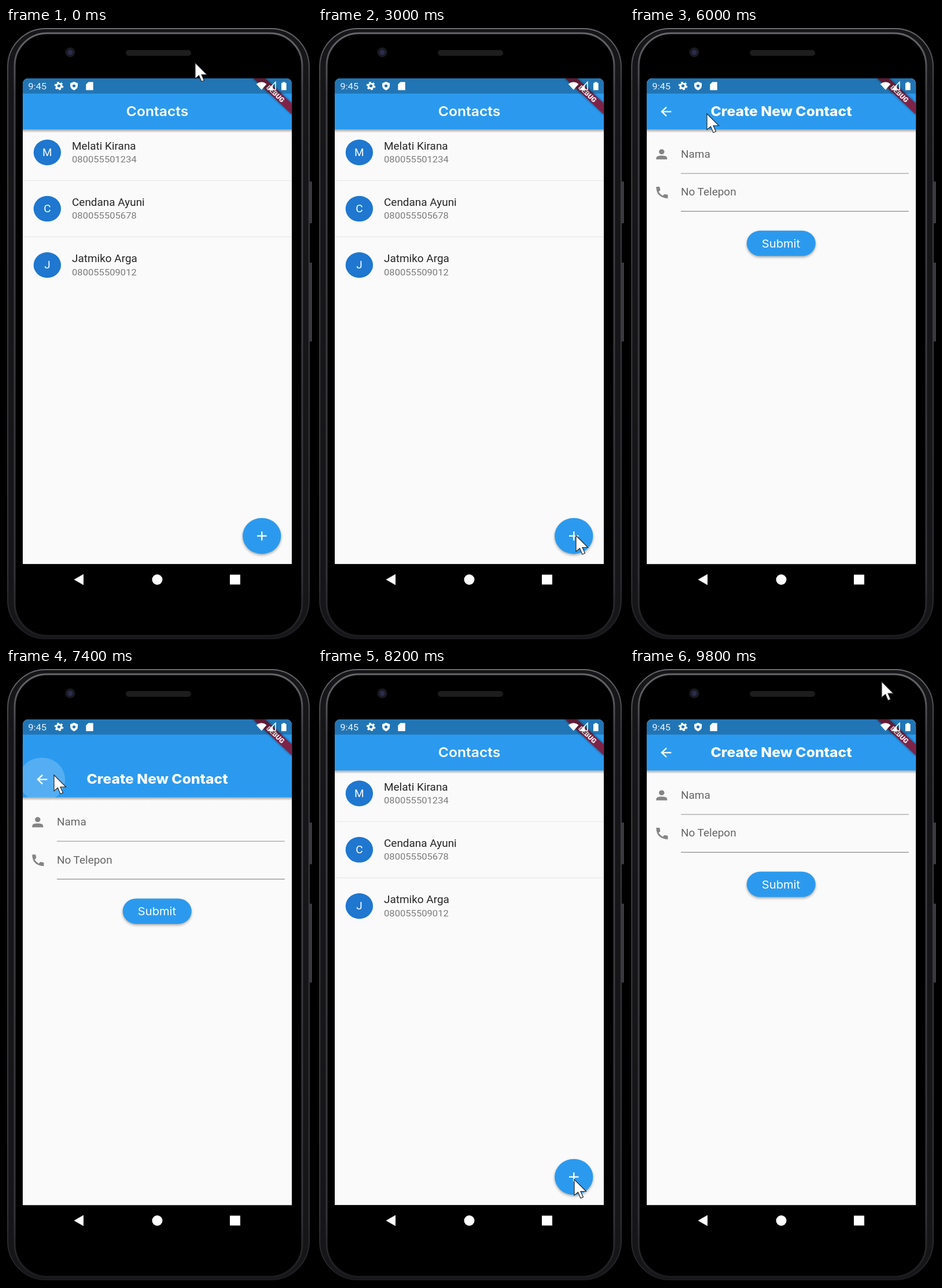
An HTML page for the animation above (9900 ms loop, 529 px wide and 1058 px high).

```html
<!DOCTYPE html>
<html lang="id">
<head>
<meta charset="utf-8">
<title>Contacts</title>
<style>
html, body { margin: 0; width: 100%; height: 100%; overflow: hidden; background: #000; }
svg { display: block; width: 100%; height: 100%; font-family: Roboto, sans-serif; }
.head { font-family: Inter, sans-serif; fill: #fff; text-anchor: middle; }
.name { font-size: 16px; fill: #252525; }
.tel { font-size: 14px; fill: #7b7b7b; }
.label { font-size: 16px; fill: #666; }
.mid { text-anchor: middle; fill: #fff; }
.raised { filter: drop-shadow(0 2px 2px #0005); }
.ribbon { filter: drop-shadow(0 0 2px #0008); }
</style>
</head>
<body>
<svg viewBox="0 0 529 1058" preserveAspectRatio="none">
  <defs>
    <linearGradient id="shade" x2="0" y2="1">
      <stop stop-color="#000" stop-opacity=".32"/>
      <stop offset="1" stop-color="#000" stop-opacity="0"/>
    </linearGradient>
    <linearGradient id="rim" x2="0" y2="1">
      <stop stop-color="#66666b"/>
      <stop offset=".1" stop-color="#3f3f44"/>
      <stop offset=".9" stop-color="#343438"/>
      <stop offset="1" stop-color="#1c1c1f"/>
    </linearGradient>
    <clipPath id="screen"><path d="M0 757V11Q0 0 10 0H383Q393 0 393 11V757Z"/></clipPath>
    <clipPath id="bar"><path d="M0 0H393V80H0Z"/></clipPath>
    <g id="appbar">
      <path d="M0 0H393V757H0Z" fill="#fafafa"/>
      <path d="M0 80H393V85H0Z" fill="url(#shade)"/>
      <path d="M0 0H393V80H0Z" fill="#2b9aee"/>
    </g>
  </defs>

  <!-- phone body -->
  <path d="M527 265v72M527 405v136" stroke="#3a3a3e" stroke-width="4"/>
  <rect x="3" y="1" width="521" height="1053" rx="66" fill="#161618" stroke="url(#rim)" stroke-width="2"/>
  <rect x="15" y="9" width="497" height="1040" rx="56" stroke="url(#rim)" stroke-width="3"/>
  <circle cx="111" cy="42" r="8.5" fill="#191920"/>
  <circle cx="111" cy="42" r="4.5" fill="#2b2b4c"/>
  <rect x="207" y="38" width="113" height="10" rx="5" fill="#1d1d1e"/>

  <!-- app screen, laid out in dp -->
  <g transform="translate(28.7 86.7) scale(1.185 1.108)">
    <g clip-path="url(#screen)">
      <g id="list">
        <use href="#appbar"/>
        <text class="head" x="196.5" y="58.7" font-size="20.8" font-weight="600">Contacts</text>
        <g id="rows"></g>
        <path d="M0 159.3H393M0 247H393" stroke="#e6e6e6"/>
        <circle class="raised" cx="349" cy="713" r="28" fill="#2b9aee"/>
        <path d="M342 713h14m-7-7v14" stroke="#fff" stroke-width="2"/>
      </g>
      <g id="form">
        <use href="#appbar"/>
        <g clip-path="url(#bar)"><circle id="ripple" cx="28" cy="52" r="34" fill="#fff" opacity=".2"/></g>
        <path d="M36 52H22m7-7-7 7 7 7" fill="none" stroke="#fff" stroke-width="2"/>
        <text class="head" x="196.5" y="58.7" font-size="20.8" font-weight="800">Create New Contact</text>
        <g fill="#858585">
          <circle cx="22" cy="114.5" r="4"/>
          <path d="M14 126.500v-2q0-4 8-4t8 4v2z"/>
          <path d="M14 169h5l1 5.500-2.500 2.500q2.500 4 6 6l2.500-2.500 5 1v5.500q-17-1-17-18z"/>
        </g>
        <text class="label" x="50" y="124">Nama</text>
        <text class="label" x="50" y="183">No Telepon</text>
        <path d="M50 148.3H382.5M50 207.3H382.5" stroke="#8d8d8d"/>
        <rect class="raised" x="146" y="237.5" width="100.5" height="39.5" rx="19.75" fill="#2b9aee"/>
        <text class="head" x="196" y="263.5" font-size="17">Submit</text>
      </g>
      <g transform="translate(393 0) rotate(45)">
        <path class="ribbon" d="M-40 28h80v12h-80z" fill="#7d2347"/>
        <text class="mid" y="37.7" font-size="10.2" font-weight="900">DEBUG</text>
      </g>
      <path d="M0 0H393V24H0Z" opacity=".24"/>
      <text x="8" y="17" font-size="14" fill="#eef5fb">9:45</text>
      <g fill="#fff">
        <circle cx="53" cy="12" r="3.6" fill="none" stroke="#fff" stroke-width="2.8"/>
        <circle cx="53" cy="12" r="5.6" fill="none" stroke="#fff" stroke-width="2" stroke-dasharray="2.93"/>
        <path d="M75 5.5l5.5 2.3v4q0 4.8-5.5 7-5.5-2.2-5.5-7v-4z"/>
        <circle cx="75" cy="12" r="2.2" fill="#2376b5"/>
        <path d="M96 6h7v12.5h-10.5v-9z"/>
        <path d="M341 9q7.5-6 15 0l-7.5 9z"/>
        <path d="M369 6v12h-11z" fill="none" stroke="#fff" stroke-width="1.3"/>
        <path d="M365 10.500v7.500h-7z"/>
        <path d="M377.500 7.300h2V6h3.300v1.300h2v11.200h-7.300z"/>
      </g>
    </g>
  </g>

  <!-- navigation bar -->
  <g fill="#fff">
    <path d="M117.5 952l16.500-9.500v19z"/>
    <circle cx="261.5" cy="952" r="9"/>
    <path d="M387 943.5h18v17h-18z"/>
  </g>
  <path id="cursor" d="M0 0V27.500L6.500 22 11 32.500 15.500 30.500 11 20.500H20.500Z" fill="#fff" stroke="#26282d" stroke-width="1.2"/>
</svg>
<script>
const LOOP = 9900, STEP = 100, HEIGHT = 757;
const $ = id => document.getElementById(id);

const people = [
  ['Melati Kirana', '080055501234'],
  ['Cendana Ayuni', '080055505678'],
  ['Jatmiko Arga', '080055509012'],
];
$('rows').innerHTML = people.map(([name, tel], i) => `
  <g transform="translate(0 ${i * 87.7})">
    <circle cx="36" cy="115.6" r="20" fill="#1f77d0"/>
    <text class="mid" x="36" y="121.2" font-size="16">${name[0]}</text>
    <text class="name" x="72" y="111">${name}</text>
    <text class="tel" x="72" y="131.3">${tel}</text>
  </g>`).join('');

// where the pointer pauses or turns: time, x, y
const stops = [
  [0, 327, 60], [500, 456, 794], [1100, 506, 822], [1700, 416, 862],
  [2600, 446, 876], [4200, 446, 876], [4700, 357, 181], [5200, 432, 16],
  [5700, 430, 12], [6000, 133, 148], [6900, 60, 145], [7400, 83, 183],
  [8200, 443, 881], [8700, 443, 881], [9600, 438, 38], [LOOP, 434, 16],
];

const ease = k => k * k * (3 - 2 * k);

function pointer(t) {
  const i = stops.findIndex(s => s[0] > t);
  const [t0, x0, y0] = stops[i - 1], [t1, x1, y1] = stops[i];
  const k = ease((t - t0) / (t1 - t0));
  return [x0 + (x1 - x0) * k, y0 + (y1 - y0) * k];
}

// distance the form is pushed down; k = 0 is open, k = 1 is gone
const slide = k => HEIGHT * Math.min(1, Math.max(0, k)) ** 1.8;

function formY(t) {
  if (t < 3800) return HEIGHT;
  return t < 8700 ? slide((t - 7320) / 400) : slide((9015 - t) / 600);
}

function draw(now) {
  const t = Math.floor(now % LOOP / STEP) * STEP;
  const y = formY(t);
  $('form').setAttribute('transform', `translate(0 ${y})`);
  $('form').style.display = y < HEIGHT ? '' : 'none';
  $('ripple').style.display = t >= 7400 && t < 7800 ? '' : 'none';
  $('cursor').setAttribute('transform', `translate(${pointer(t)})`);
  requestAnimationFrame(draw);
}
draw(0);
</script>
</body>
</html>
```
